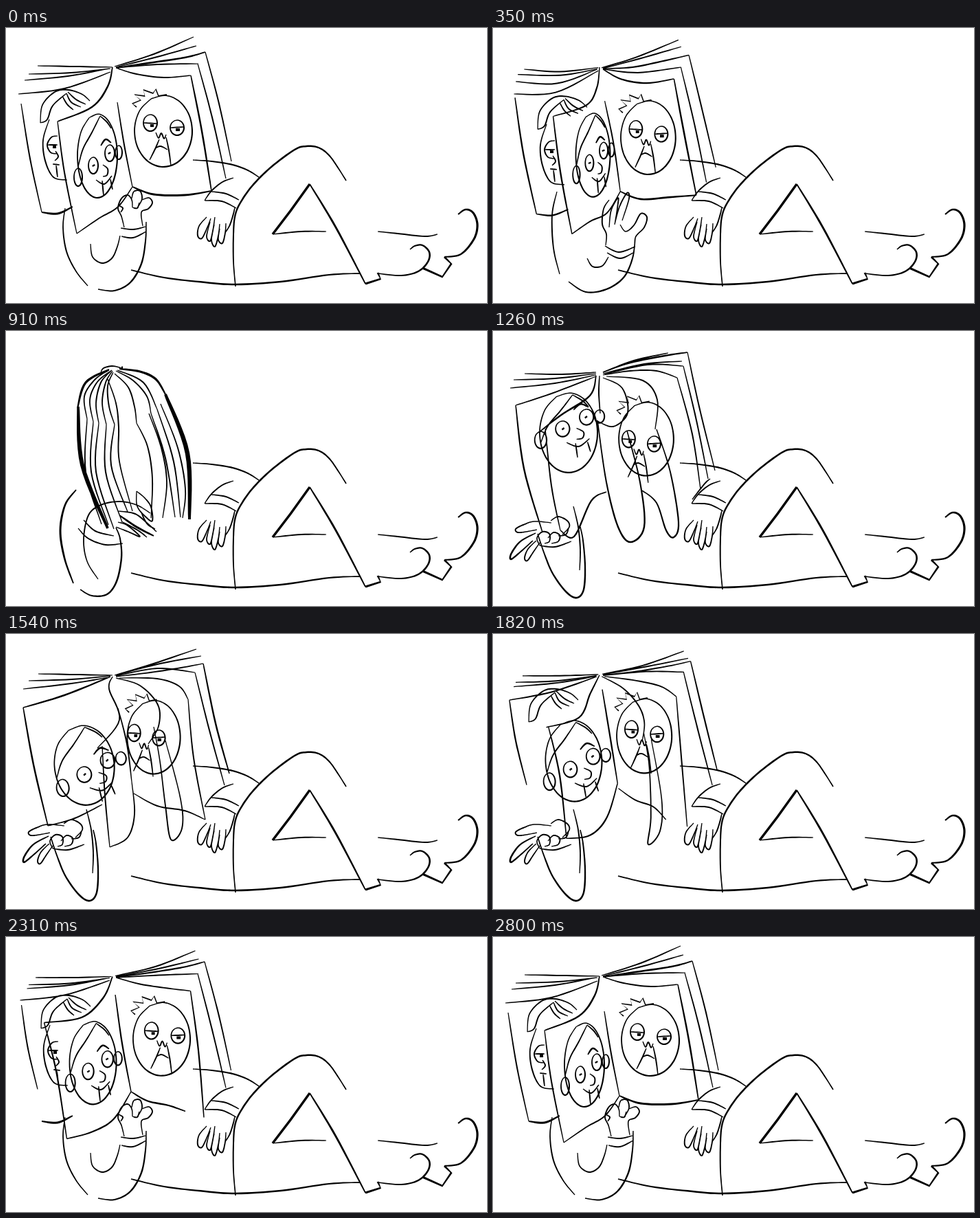
Write an HTML page that moves like this. It is 700 by 400 pixels and loops after 2.87 s.

```html
<!DOCTYPE html>
<html lang="en">
<head>
<meta charset="utf-8">
<title>Reader</title>
<style>
html, body { margin: 0; width: 100%; height: 100%; overflow: hidden; background: #fff; }
svg { display: block; width: 100%; height: 100%; }
</style>
</head>
<body>
<svg viewBox="0 0 700 400"><path id="still"/><path id="moving"/></svg>
<script>
const LOOP = 2870, STEP = 70;

// A stroke is "x,y x,y ...". A repeated point makes a corner,
// "!" joins points with straight lines, "4|" sets the brush width.
const body = [
  '2.2|272,192 300,194 330,199 352,207 368,217',
  '2.6|334,376 331,340 331,300 333,275 340,256 358,230 385,203 420,177 437,172 455,174 470,185 483,203 495,222',
  '466,296 430,296 388,300',
  '3.4|!388,300 414,266 442,227',
  '2.8|442,227 480,290 523,372',
  '3|!523,372 545,365 541,356',
  '2.6|541,357 575,360 600,354 614,340 616,326 606,316 595,317 588,322',
  '541,296 570,299 610,303 628,300',
  '3|!606,349 635,362 648,343 638,333',
  '3.2|638,333 662,329 681,307 686,286 680,269 669,264 658,271',
  '2.6|182,352 230,363 290,370 335,373 400,369 470,359 515,357',
  '289,251 299,237 315,224 331,218',
  '299,238 320,241 339,250',
  '289,251 314,252 335,262',
  '292,275 281,288 279,302 285,306 293,290 298,277',
  '297,282 292,303 297,310 301,295 304,275',
  '303,286 299,308 304,318 309,302 311,285',
  '311,292 309,308 315,313 319,298 320,284',
  '319,298 326,286 331,270 333,261'
];

const holding = [
  '86,262 83,290 88,325 102,354 119,375',
  '2.4|134,380 158,382 181,370 197,343 203,310 204,282',
  '123,314 126,333 140,342 154,335 162,318 166,302',
  '167,291 185,293 203,289',
  '168,303 185,305 204,296',
  '172,290 168,274 163,262 168,248 177,243 183,250 184,261',
  '183,248 186,238 195,237 198,248 193,259',
  '198,250 208,247 213,254 207,263 197,268 199,288',
  '164,258 170,262 167,268', '184,261 191,262 194,254'
];
const open = [
  '93,238 86,272 88,320 97,358',
  '2.4|110,369 135,384 165,380 190,363 203,335 207,306',
  '137,335 145,347 159,346 168,333',
  '163,317 183,326 207,318', '166,327 185,335 204,327',
  '164,316 165,300 159,285 161,263 169,250',
  '169,290 172,265 182,247 181,262 177,286',
  '177,286 184,260 195,240 198,248 188,280',
  '185,286 193,296 205,287 215,270 224,275 220,290 208,303 206,316'
];
const tucked = [
  '3|102,231 86,253 79,290 85,330 98,367',
  '2.5|108,376 125,385 147,383 161,364 168,330 166,302 160,286',
  '134,361 118,335 113,303 120,268 138,253 165,248 190,253 210,265',
  '105,287 120,302 145,311 170,309', '113,275 130,291 157,298',
  '164,262 188,266 206,280 219,292', '3|165,268 190,285 215,298',
  '168,277 192,290 205,300', '160,285 178,292 195,299 177,283 163,278',
  '190,233 191,255 204,271 213,276 211,256 202,243 190,233', '196,262 205,280 217,288'
];
const away = [
  '2.6|65,295 74,322 87,353 107,380 122,388 132,376 134,342 131,305 127,285',
  '117,255 124,285 127,318 126,348',
  '64,289 48,292 36,293 33,288 44,282 60,277 85,279',
  '2.6|62,294 40,306 27,323 26,332 38,323 58,305',
  '63,305 51,317 46,330 50,334 59,321 68,308',
  '84,276 95,270 108,276 111,285 101,296',
  '68,312 64,301 72,292 82,295 82,306 75,309',
  '80,301 88,293 97,297 95,306 85,309',
  '95,298 106,296 110,287', '68,312 90,314 114,306'
];
const arms = [[0, holding], [280, open], [735, tucked], [1085, away], [2310, holding]];

const first = {
  t: 0,
  book: {
    l1: '46,55 100,56 155,57', l2: '33,67 95,65 152,59', l3: '27,76 90,70 150,59', l4: '18,96 85,88 152,64',
    r1: '158,56 215,38 273,13', r2: '160,57 220,42 277,26', r3: '2.6|160,58 200,52 260,43 290,35',
    r4: '160,58 220,53 280,52', r5: '160,58 190,67 230,72 269,69',
    s1: '290,35 310,110 328,194', s2: '279,52 300,130 320,219', s3: '2.5|269,69 285,150 299,237',
    side: '22,110 35,190 52,268', foot: '3|52,268 75,270 97,260',
    top: '2.6|155,57 148,85 125,115 75,136', edge: '75,136 85,210 103,299',
    hem: '103,299 135,277 163,260 184,231', gutter: '162,108 172,170 184,231', base: '3|184,231 215,242 260,243 299,237'
  },
  face: { man: [229, 150, 1, 1, 0, 0, 0], girl: [133, 186, 1, 1, 0, 0, 0], back: [85, 155, 1, 1, 0, 0, 0] }
};
const poses = [first, {
  t: 560,
  book: {
    l1: '45,63 95,68 152,58', l2: '38,68 100,71 152,60', l3: '37,79 95,87 152,61', l4: '38,96 95,97 154,61',
    r1: '158,59 205,45 268,20', r2: '160,60 210,46 272,28', r3: '160,60 205,60 245,50 282,42',
    r4: '160,61 205,72 270,60', r5: '2.6|160,61 185,79 220,85 260,77',
    s1: '282,42 300,120 322,208', s2: '270,60 290,150 305,228', s3: '2.5|260,77 275,160 294,247',
    side: '2.6|38,96 50,180 70,272', foot: '70,272 93,274 117,266',
    top: '155,57 153,88 142,111 95,124', edge: '2.5|95,124 106,210 122,300',
    hem: '122,300 145,284 168,274 186,242', gutter: '163,105 178,170 186,242', base: '2.6|186,242 215,253 255,248 294,247'
  },
  face: { man: [224, 165, .92, 1.05, 0, 0, 0], girl: [153, 184, .78, 1, 0, 0, -4], back: [109, 170, 1, 1, 0, 0, -4] }
}, {
  t: 910,
  book: {
    l4: '3.4|104,112 116,75 150,56', side: '6|105,110 111,195 148,287', top: '154,57 133,74 122,100 127,132',
    edge: '127,132 124,205 149,282', r3: '3.4|165,55 195,59 218,70 232,92', s1: '6.5|232,92 264,178 267,274',
    r4: '162,57 200,75 220,114', s2: '220,114 244,190 254,271',
    r5: '160,58 185,72 205,95 211,120', s3: '211,120 232,185 246,271',
    mid: '158,62 178,82 187,110 190,134', fall: '190,134 206,168 213,215 211,272',
    c1: '153,58 138,75 131,105 135,134', d1: '135,134 131,205 157,288',
    c2: '155,58 145,75 140,105 146,136', d2: '146,136 145,205 169,278',
    c3: '156,60 148,80 150,110 158,136', d3: '158,136 153,195 177,263',
    c4: '150,57 130,70 114,95 118,128', d4: '118,128 116,205 139,281',
    e1: '148,70 160,105 164,140 165,190 184,262', e2: '208,120 226,170 234,220 228,272',
    e3: '225,106 250,170 261,230 257,272',
    cap: '138,60 142,54 155,51 168,54', knob: '5|!168,54 170,54'
  },
  face: {}
}, {
  t: 1260,
  book: {
    l1: '46,62 100,63 150,60', l2: '30,71 90,69 150,62', l3: '25,83 90,76 150,64', l4: '33,108 85,91 150,66',
    r1: '160,60 205,43 255,32', r2: '160,62 220,48 275,44', r3: '2.6|160,60 200,46 250,36 283,31',
    r4: '162,63 225,49 277,51', r5: '160,64 200,58 238,58 268,68',
    s1: '283,31 300,110 323,203', s2: '277,51 296,130 313,215', s3: '268,68 290,150 302,230',
    side: '2.5|33,108 45,200 72,293', top: '2.6|150,65 141,94 98,123 66,148', edge: '76,142 85,225 98,290',
    hem: '2.4|98,290 118,299 143,247 165,234', gutter: '155,65 154,90 156,120',
    curl: '160,68 188,83 196,119 175,139 150,130',
    tongue: '2.6|152,130 165,220 182,285 200,307 220,285 214,220 195,145',
    arc: '165,66 218,72 239,100 236,143', tail: '2.4|217,232 238,250 252,290 263,300 270,278 258,205 238,143',
    base: '290,245 300,232 310,220 316,215'
  },
  face: { man: [223, 157, .95, 1.03, 0, -8, 12], girl: [110, 148, 1.45, .95, 0, 0, -20] }
}, {
  t: 1540,
  book: {
    l1: '47,58 100,59 155,60', l2: '33,68 95,66 152,61', l3: '25,80 95,72 150,63', l4: '2.5|25,107 85,89 152,62',
    r1: '158,60 215,43 277,22', r2: '160,60 220,44 284,32', r3: '160,62 210,56 255,49 287,43',
    r4: '160,61 220,50 275,56', r5: '165,64 220,65 252,76 265,95',
    s1: '2.5|287,43 305,130 325,203', s2: '275,56 296,140 318,220', s3: '265,95 273,180 290,270',
    side: '2.5|25,107 40,190 61,279', foot: '61,279 100,268 140,248',
    top: '155,62 150,80 165,125 133,166', edge: '140,163 144,235 151,310',
    hem: '151,310 177,296 187,262 183,215', gutter: '163,108 176,160 183,215',
    curl: '160,64 195,75 221,103 222,134 207,160',
    tongue: '215,135 224,185 232,250 240,299 256,283 254,240 232,155', base: '186,232 220,250 260,257 290,270'
  },
  face: { man: [215, 150, .92, 1.03, 0, -12, 6], girl: [114, 191, 1.5, .95, -.1, 5, 0] }
}, {
  t: 2030,
  book: {
    l1: '40,63 95,62 152,58', l2: '33,72 90,70 150,60', l3: '34,74 95,70 150,60', l4: '23,88 85,81 150,62',
    r1: '160,57 220,48 278,27', r2: '160,58 215,52 284,38', r3: '160,58 210,53 255,45 288,37',
    r4: '160,60 225,58 280,55', r5: '160,60 200,70 240,77 268,88',
    s1: '288,37 310,120 327,194', s2: '279,55 300,140 320,220', s3: '268,88 275,180 277,288',
    side: '23,88 28,130 40,175', top: '2.5|155,58 135,92 95,119 36,113', edge: '2.5|36,113 62,185 74,288',
    hem: '2.6|74,288 115,290 150,270 180,219', gutter: '2.5|156,60 166,140 180,219',
    curl: '157,60 185,82 205,105 219,125 225,152',
    tongue: '223,152 230,200 228,280 215,311 233,290 239,240 229,152', base: '180,219 197,235 213,247 223,270'
  },
  face: { man: [224, 147, .98, 1.05, 0, 8, 0], girl: [120, 180, 1.35, .98, 0, 0, -3], back: [87, 145, 1, 1, 0, 0, 0, 1] }
}, { ...first, t: 2590 }];

// Face parts around the face centre; rings are [cx, cy, rx, ry].
const faces = {
  man: {
    head: [[0, 0, 42, 52]],
    hair: ['!-39,-35 -45,-40 -33,-45 -42,-53 -27,-51 -29,-60 -15,-55 -11,-61 -7,-51 5,-53'],
    rings: [[-19, -12, 10, 12], [20, -5, 10, 11]],
    lines: ['-29,-12 -9,-11', '10,-5 30,-6', '4|!-19,-8 -14,-8', '4|!18,-2 24,-2', '-11,2 -7,10 -3,3 1,11 4,5',
      '-12,25 -4,22 6,27', '-6,12 -12,26 -20,42', '4,9 8,28 11,50']
  },
  girl: {
    head: [[0, 0, 29, 61]],
    hair: ['4,-58 -8,-34 -21,-10 -28,16', '4,-58 14,-49 20,-40'],
    rings: [[-28, 31, 6, 13], [31, -5, 5, 10], [-6, 14, 7, 12], [18, -4, 7, 12]],
    lines: ['4|!-6,13 -5,15', '4|!17,-5 18,-3', '2.6|5,-15 12,-24 20,-19', '8,13 15,19 14,28 8,30',
      '-2,35 10,41 21,29', '7,36 9,58', '19,34 22,49']
  },
  back: {
    head: [],
    hair: ['-35,-17 -32,-43 -14,-62 5,-65 25,-59 37,-49', '-35,-17 -25,-22 -17,-42 3,-60', '3,-60 10,-47 24,-40',
      '-3,-56 4,-44 13,-36', '5,-62 17,-51 31,-44'],
    rings: [],
    lines: ['-22,-22 -31,8 -28,38 -16,62 4,66', '-10,2 -19,4 -25,15 -20,26 -10,28', '-24,15 -10,15', '4|!-17,18 -12,18',
      '-13,24 -9,32 -14,38', '-17,43 -7,44', '-12,45 -10,62']
  }
};

const lerp = (a, b, k) => a + (b - a) * k;
const cache = {};

function parse(s) {
  if (cache[s]) return cache[s];
  const m = s.match(/^(?:([\d.]+)\|)?(!?)(.*)$/);
  return cache[s] = {
    w: +(m[1] || 2), sharp: !!m[2],
    p: m[3].split(' ').map(q => q.split(',').map(Number))
  };
}

// Smooth curve through the points.
function sample({ p, sharp }) {
  if (sharp) return p;
  const out = [p[0]], n = 8;
  for (let i = 0; i < p.length - 1; i++) {
    const b = p[i], c = p[i + 1], a = p[i - 1] || b, d = p[i + 2] || c;
    if (b[0] === c[0] && b[1] === c[1]) continue;
    for (let j = 1; j <= n; j++) {
      const t = j / n;
      out.push([0, 1].map(k => b[k] + t / 2 * (c[k] - a[k] +
        t * (2 * a[k] - 5 * b[k] + 4 * c[k] - d[k] + t * (3 * (b[k] - c[k]) + d[k] - a[k])))));
    }
  }
  return out;
}

// Outline of a brush line, thin at its ends.
function brush(s) {
  const q = sample(s), left = [], right = [], n = q.length - 1;
  q.forEach(([x, y], i) => {
    const a = q[Math.max(0, i - 1)], b = q[Math.min(n, i + 1)];
    const dx = b[0] - a[0], dy = b[1] - a[1], len = Math.hypot(dx, dy) || 1;
    const h = s.w / 2 * (s.sharp ? 1 : .6 + .4 * Math.sin(Math.PI * i / n));
    const ox = -dy / len * h, oy = dx / len * h;
    left.push((x + ox).toFixed(1) + ' ' + (y + oy).toFixed(1));
    right.unshift((x - ox).toFixed(1) + ' ' + (y - oy).toFixed(1));
  });
  return 'M' + left.concat(right).join('L') + 'Z';
}

const draw = list => list.map(s => brush(parse(s))).join('');

function ring([cx, cy, rx, ry]) {
  const p = [];
  for (let i = 0; i <= 12; i++) {
    const a = i / 12 * 2 * Math.PI - 2;
    p.push([cx + rx * Math.cos(a), cy + ry * Math.sin(a)]);
  }
  return { w: 2.2, p };
}

function drawFace(kind, [cx, cy, sx, sy, rot, dx, dy, hairOnly]) {
  const f = faces[kind], c = Math.cos(rot), n = Math.sin(rot);
  const put = (s, ox, oy) => brush({
    ...s, p: s.p.map(([x, y]) => {
      const u = (x + ox) * sx, v = (y + oy) * sy;
      return [cx + u * c - v * n, cy + u * n + v * c];
    })
  });
  const outer = [...f.head.map(ring), ...f.hair.map(parse)];
  const inner = hairOnly ? [] : [...f.rings.map(ring), ...f.lines.map(parse)];
  return outer.map(s => put(s, 0, 0)).join('') + inner.map(s => put(s, dx, dy)).join('');
}

// Shared parts move between poses; others switch halfway.
function blend(a, b, k, mix) {
  const near = k < .5 ? a : b;
  return Object.keys({ ...a, ...b }).map(n =>
    a[n] && b[n] ? mix(n, a[n], b[n], k) : near[n] ? mix(n, near[n], near[n], 0) : '').join('');
}

function mixStroke(name, a, b, k) {
  const s = parse(a), e = parse(b);
  if (s.p.length !== e.p.length) return brush(k < .5 ? s : e);
  return brush({
    w: lerp(s.w, e.w, k), sharp: s.sharp,
    p: s.p.map((q, i) => [lerp(q[0], e.p[i][0], k), lerp(q[1], e.p[i][1], k)])
  });
}

function mixFace(name, a, b, k) {
  const v = a.slice(0, 7).map((x, i) => lerp(x, b[i], k));
  return drawFace(name, [...v, (k < .5 ? a : b)[7]]);
}

function render(ms) {
  const t = Math.floor(ms % LOOP / STEP) * STEP;
  let i = 0;
  while (i < poses.length - 2 && t >= poses[i + 1].t) i++;
  const a = poses[i], b = poses[i + 1];
  const k = Math.min(1, (t - a.t) / (b.t - a.t));
  const arm = arms.filter(x => x[0] <= t).pop()[1];
  return draw(arm) + blend(a.book, b.book, k, mixStroke) + blend(a.face, b.face, k, mixFace);
}

const moving = document.getElementById('moving');
document.getElementById('still').setAttribute('d', draw(body));
const start = performance.now();
function tick() {
  moving.setAttribute('d', render(performance.now() - start));
  requestAnimationFrame(tick);
}
tick();
</script>
</body>
</html>
```
